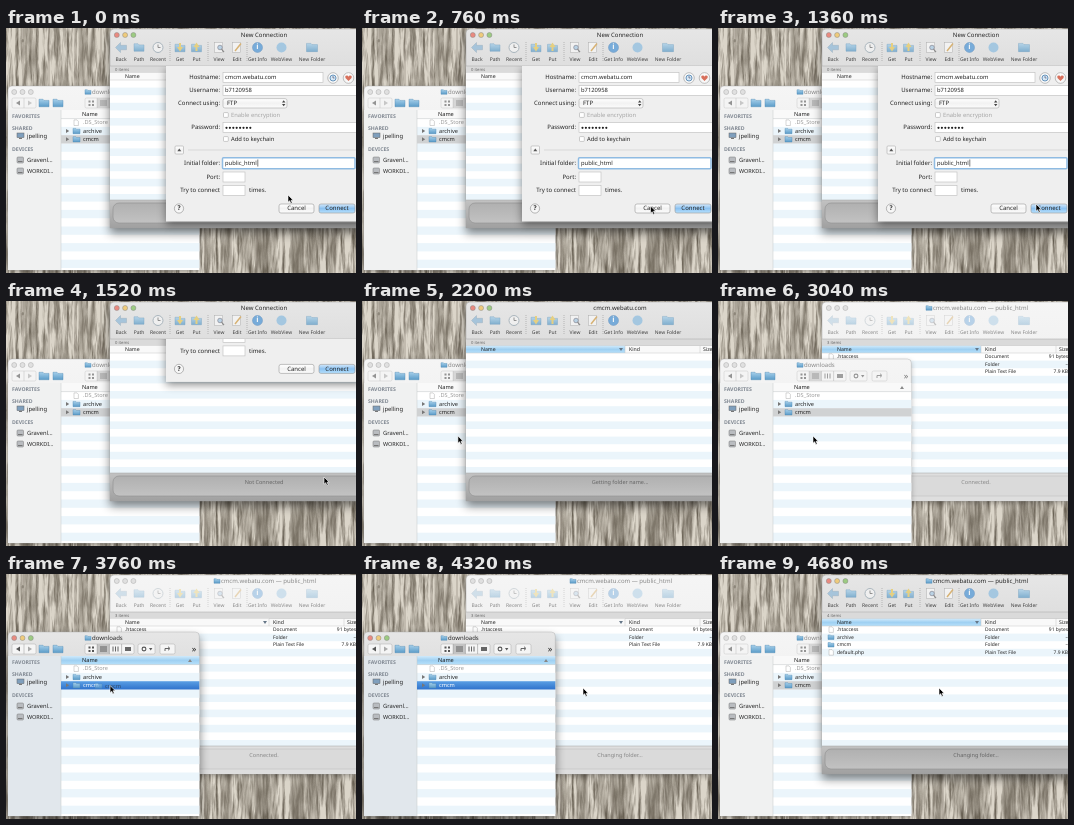
An HTML page that plays this animation: 350 px wide and 245 px high, repeating every 6680 ms.

```html
<!DOCTYPE html>
<html lang="en">
<head>
<meta charset="utf-8">
<title>Upload a folder</title>
<style>
html, body { margin: 0; width: 100%; height: 100%; overflow: hidden; background: #cbc5b8; }
svg { position: absolute; left: 0; top: 0; width: 100vw; height: 100vh; }
#wall { will-change: transform; }
text { font-family: "Noto Sans", "Open Sans", sans-serif; fill: #222; text-rendering: geometricPrecision; }
.win { filter: drop-shadow(0 2px 2.5px rgba(0,0,0,.25)); }
.win.front { filter: drop-shadow(0 5px 5px rgba(0,0,0,.48)); }
.chrome { fill: url(#pale); }
.front .chrome { fill: url(#steel); }
.icons { opacity: .72; }
.win:not(.front) .icons { opacity: .6; }
.win:not(.front) .tools { opacity: .6; }
.win:not(.front) .light { fill: #e0e0e0; stroke: #aaa; }
.win:not(.front) .title { fill: #888; }
.side { fill: #f0f1f1; }
.front .side { fill: #e1e7ec; }
.head { fill: #f9f9f9; }
.focus .head { fill: url(#sky); }
.pick { fill: #d0d2d3; }
.focus .pick { fill: url(#pickBlue); }
.focus .pickText { fill: #fff; }
.foot { fill: #dedede; }
.front .foot { fill: url(#footer); }
.pill { fill: #dadada; stroke: #c0c0c0; stroke-width: .6; }
.front .pill { fill: url(#pillFill); stroke: #8f8f8f; }
.status { fill: #666; }
.win:not(.front) .status { fill: #888; }
</style>
</head>
<body>
<svg id="wall" viewBox="0 0 350 245" preserveAspectRatio="none"></svg>
<svg id="stage" viewBox="0 0 350 245" preserveAspectRatio="none"></svg>
<script>
const LOOP = 6680;
const $ = id => document.getElementById(id);

let seed = 11;
const rnd = () => (seed = seed * 16807 % 2147483647) / 2147483647;
const between = (a, b) => (a + rnd() * (b - a)).toFixed(1);
const range = (n, f) => Array.from({ length: n }, (_, i) => f(i)).join('');

const rect = (x, y, w, h, fill, more = '') =>
  `<rect x="${x}" y="${y}" width="${w}" height="${h}" fill="${fill}" ${more}/>`;
const circle = (x, y, r, fill, more = '') =>
  `<circle cx="${x}" cy="${y}" r="${r}" fill="${fill}" ${more}/>`;
const path = (d, fill, more = '') => `<path d="${d}" fill="${fill}" ${more}/>`;
const line = (d, color, w = .6) => path(d, 'none', `stroke="${color}" stroke-width="${w}"`);
// y is the vertical middle of the lowercase letters
const text = (x, y, s, size = 6, more = '') =>
  `<text x="${x}" y="${y + size * .32}" font-size="${size}" ${more}>${s}</text>`;
const mid = 'text-anchor="middle"', end = 'text-anchor="end"';
const grad = (id, ...colors) =>
  `<linearGradient id="${id}" x1="0" y1="0" x2="0" y2="1">${colors.map((c, i) =>
    `<stop offset="${i / (colors.length - 1)}" stop-color="${c}"/>`).join('')}</linearGradient>`;

const defs = `<defs>
${grad('steel', '#e6e6e6', '#d2d2d2', '#b8b8b8')}
${grad('pale', '#f5f5f5', '#e6e6e6')}
${grad('sky', '#d0eafb', '#9fd0f2', '#b6e0fa')}
${grad('pickBlue', '#5a9fe4', '#2f72cc')}
${grad('footer', '#c2c2c2', '#a0a0a0')}
${grad('pillFill', '#b0b0b0', '#c2c2c2')}
${grad('button', '#ffffff', '#f2f2f2', '#fcfcfc')}
${grad('go', '#d3e8fb', '#8cc2f1', '#b5e0fd')}
${grad('folder', '#a5cfea', '#5c9cc8')}
<clipPath id="below"><rect x="104" y="38" width="246" height="207"/></clipPath>
</defs>`;

// weathered boards: stretched noise as grain, plus seams and stains
function wood() {
  const grain = (id, freq, gain, shift, n) =>
    `<filter id="${id}" x="0" y="0" width="1" height="1" color-interpolation-filters="sRGB">
<feTurbulence type="fractalNoise" baseFrequency="${freq}" numOctaves="4" seed="${n}"/>
<feColorMatrix values="0 0 0 0 .41 0 0 0 0 .38 0 0 0 0 .33 ${gain} 0 0 0 ${shift}"/></filter>` +
    rect(0, 0, 350, 245, '#000', `filter="url(#${id})"`);
  return rect(0, 0, 350, 245, '#dbd5c9') +
    grain('fine', '.3 .03', 2.4, -1, 4) + grain('broad', '.07 .012', 3, -1.45, 9) +
    range(14, i => line(`M${i * 26 + 17} 0V245`, 'rgba(95,88,76,.5)', .8)) +
    range(30, () => `<ellipse cx="${between(0, 350)}" cy="${between(0, 245)}" rx="${between(.4, 1.2)}" ry="${between(1, 7)}" fill="#5b5448" opacity=".45"/>`);
}

const folder = (x, y, w = 7) => {
  const h = w * .75;
  return path(`M${x} ${y - h / 2}h${w * .4}l${w * .1} ${h * .15}h${w * .5}v${h * .85}h${-w}z`,
    'url(#folder)', 'stroke="#4b86b0" stroke-width=".4"');
};
const page = (x, y) => path(`M${x} ${y - 2.8}h3l1.4 1.4v4.2h-4.4z`, '#fff', 'stroke="#999" stroke-width=".4"');
const lights = (x, y) => ['#e98a80', '#efcb7c', '#9ccb82'].map((c, i) =>
  circle(x + i * 8.3, y, 2.5, c, 'class="light" stroke="#888" stroke-width=".5"')).join('');
const stripes = (x, y, w, pitch, bottom) => rect(x, y, w, bottom - y, '#fff') +
  range(Math.ceil((bottom - y) / pitch), i => i % 2
    ? rect(x, y + i * pitch, w, Math.min(pitch, bottom - y - i * pitch), '#ebf5fb') : '');

function finder() {
  const row = i => 94.7 + i * 8.3;
  const box = (x, w) => rect(x, 70, w, 10, '#f5f5f5', 'rx="1.6" stroke="#aaa" stroke-width=".5"');
  const label = (y, s) => text(6, y, s, 5.2, 'font-weight="600" style="fill:#7f8791"');
  const disk = y => rect(11, y - 3, 6.5, 6, '#b9bcc0', 'rx="1" stroke="#777" stroke-width=".5"') +
    rect(12, y + 1, 4.5, 1, '#777');
  const arrow = y => path(`M60 ${y - 2}l3.2 2l-3.2 2z`, '#777');
  const tiles = [[82.5, 72.5], [86, 72.5], [82.5, 76], [86, 76]];
  return `<g id="finder" class="win">
${path('M2 242V62q0-4 4-4H189.300q4 0 4 4V242z', '#fff', 'class="chrome" stroke="#aaa" stroke-width=".4"')}
${lights(8.2, 64)}${folder(79, 64, 6)}${text(86, 64, 'downloads', 6, 'class="title"')}
<g class="tools">${box(6, 24)}${line('M18 70V80', '#aaa')}
${path('M14 72.500v5l-4-2.500z', '#555')}${path('M22 72.500v5l4-2.500z', '#aaa')}
${box(79, 49)}${rect(91.2, 70, 12.2, 10, '#c4c4c4')}${line('M91.200 70V80M103.400 70V80M115.600 70V80', '#999')}
${tiles.map(([x, y]) => rect(x, y, 2, 2, '#555')).join('')}
${line('M94 73h7M94 75h7M94 77h7', '#444', .8)}${line('M107 72.500v5M109.500 72.500v5M112 72.500v5', '#555', .9)}
${rect(119, 73, 6, 4, '#666')}${box(132, 17)}${circle(138, 75, 1.9, 'none', 'stroke="#555" stroke-width="1.1"')}
${path('M143 74h3.400l-1.700 2.400z', '#555')}${box(154, 15)}${line('M159 77v-2.500h4M162 72.700l2 1.800l-2 1.800', '#555', .9)}
${text(188, 75, '»', 9, mid)}</g>
${folder(33, 75, 10)}${folder(47, 75, 10)}
${rect(2, 82, 53, 160, '#eee', 'class="side"')}
${label(88, 'FAVORITES')}${label(100, 'SHARED')}${label(121, 'DEVICES')}
${rect(11, 105, 7, 4.6, '#7f9fbd', 'stroke="#666" stroke-width=".5"')}${rect(13, 110, 3, 1, '#777')}
${text(21, 108, 'jpelling', 5.8)}
${disk(132)}${text(21, 132, 'Gravenl…', 5.8)}${disk(143)}${text(21, 143, 'WORKDI…', 5.5)}
${stripes(55, 90.6, 138.3, 8.3, 242)}
${rect(55, 82, 138.3, 8.6, '#fff', 'class="head"')}${line('M55 90.600H193.300M55 82V242', '#c4c8cb', .5)}
${text(76, 86.4, 'Name', 5.6)}${path('M182 88h4l-2-3z', '#888')}
${page(68, row(0))}${text(77, row(0), '.DS_Store', 5.6, 'style="fill:#999"')}
${arrow(row(1))}${folder(67, row(1))}${text(77, row(1), 'archive', 5.6)}
${rect(55, row(2) - 4.1, 138.3, 8.3, '#ccc', 'class="pick"')}
${arrow(row(2))}${folder(67, row(2))}${text(77, row(2), 'cmcm', 5.6, 'class="pickText"')}
</g>`;
}

function toolbar() {
  const names = [[115, 'Back'], [133, 'Path'], [152, 'Recent'], [174, 'Get'], [190.5, 'Put'], [213, 'View'],
    [231, 'Edit'], [251.5, 'Get Info'], [275.5, 'WebView'], [306, 'New Folder']];
  const sheetIcon = x => rect(x, 14.5, 8, 10, '#f8f8f8', 'stroke="#999" stroke-width=".5"');
  const transfer = (x, d) => folder(x - 5, 20, 10) +
    path(`M${x - 3} 19h6l-3 ${4.5 * d}z`, '#e8c95c') + rect(x - 1, d > 0 ? 15 : 19, 2, 4, '#e8c95c');
  return '<g class="tools">' + names.map(([x, s]) => text(x, 31, s, 5, mid + ' opacity=".85"')).join('') +
    '<g class="icons">' +
    path('M109.500 19.500l5-5v2.800h6v4.500h-6v2.800z', '#8fb9d8', 'stroke="#7893a8" stroke-width=".4"') +
    folder(128, 19.5, 10) +
    circle(152, 19.5, 5, '#f4f4f4', 'stroke="#93a3ae" stroke-width="1"') + line('M152 16.500v3h2.500', '#555', .8) +
    transfer(174, 1) + transfer(190.5, -1) +
    sheetIcon(208.5) + circle(214, 19.5, 2.3, '#a9cbe4', 'stroke="#667" stroke-width=".7"') +
    line('M215.500 21.200l2.500 3', '#666', 1.1) +
    sheetIcon(226.5) + line('M229 23l6-7.500', '#d3a04a', 1.5) +
    circle(251.5, 19.5, 5, '#4f97d6', 'stroke="#3d77b0" stroke-width=".5"') +
    text(251.5, 19, 'i', 7.5, mid + ' font-weight="700" style="fill:#fff"') +
    circle(275.5, 19.5, 5, '#8dbde0') +
    folder(300.5, 19.5, 11) + '</g>' +
    path('M164 14V34M202 14V34M241 14V34', 'none', 'stroke="#999" stroke-width=".6" stroke-dasharray="1 1"') + '</g>';
}

function sheet() {
  const label = (y, s) => text(214, y, s, 6, end);
  const field = (y, w, s = '') => rect(217, y - 5, w, 10, '#fff', 'stroke="#bdbdbd" stroke-width=".6"') + text(219, y, s, 5.8);
  const check = (y, s, dim) => rect(217.5, y - 2.4, 4.8, 4.8, '#fff', 'rx=".8" stroke="#aaa" stroke-width=".6"') +
    text(225, y, s, 5.8, dim ? 'style="fill:#a5a5a5"' : '');
  const button = (x, y, w, s, fill) => rect(x, y - 4.5, w, 9, fill, 'rx="2" stroke="#999" stroke-width=".6"') +
    text(x + w / 2, y, s, 6, mid);
  const round = x => circle(x, 50, 5.3, 'url(#button)', 'stroke="#999" stroke-width=".6"');
  return `<g clip-path="url(#below)"><g id="sheet">
<g style="filter:drop-shadow(0 3px 4px rgba(0,0,0,.45))">${rect(160, 38, 196, 155.5, '#efefef')}</g>
${label(49.5, 'Hostname:')}${field(49.5, 100, 'cmcm.webatu.com')}
${round(327)}${circle(327, 50, 3, '#d7e8f5', 'stroke="#4a7fb0" stroke-width=".8"')}${line('M327 48v2h1.500', '#446')}
${round(342.5)}${path('M342.500 53l-3-3q-.8-2.500 1.500-2.400q1 .1 1.500 1.200q.5-1.100 1.500-1.200q2.300-.1 1.500 2.400z', '#d8705c')}
${label(62.5, 'Username:')}${field(62.5, 140, 'b7120958')}
${label(75.3, 'Connect using:')}${rect(217, 70.6, 64, 9.4, 'url(#button)', 'rx="2" stroke="#aaa" stroke-width=".6"')}
${text(221, 75.3, 'FTP', 6)}${path('M276 74.600l1.700-2.300l1.700 2.300zM276 76l1.700 2.300l1.700-2.300z', '#444')}
${check(87, 'Enable encryption', true)}
${label(99.5, 'Password:')}${field(99.5, 140)}${range(8, i => circle(220.5 + i * 3.4, 99.8, 1.1, '#222'))}
${check(111, 'Add to keychain')}
${rect(169, 118, 8.5, 8, 'url(#button)', 'rx="1" stroke="#aaa" stroke-width=".6"')}${path('M171.300 123.300h4l-2-2.800z', '#555')}
${line('M182 122H350', '#cdcdcd', .7)}
${label(135, 'Initial folder:')}${rect(216.5, 129.7, 132.5, 11, '#fff', 'rx="1" stroke="#8fbbe2" stroke-width="1.5"')}
${text(219, 135, 'public_html', 5.8)}<path id="caret" d="M251.800 131.500v7" stroke="#222" stroke-width=".6"/>
${label(149, 'Port:')}${field(149, 22)}
${label(162.5, 'Try to connect')}${field(162.5, 22)}${text(243, 162.5, 'times.', 6)}
${circle(173, 180.5, 4.6, 'url(#button)', 'stroke="#888" stroke-width=".6"')}${text(173, 180.2, '?', 6.5, mid + ' font-weight="600"')}
${button(273, 180.5, 35, 'Cancel', 'url(#button)')}${button(313, 180.5, 36, 'Connect', 'url(#go)')}
</g></g>`;
}

function client() {
  const row = (i, icon, name, kind, size) => {
    const y = 55.6 + i * 7.6;
    return (icon ? folder(110, y, 6) : page(111, y)) + text(119, y, name, 5) +
      text(267, y, kind, 4.9) + text(350, y, size, 4.9, end);
  };
  const htaccess = row(0, 0, '.htaccess', 'Document', '91 bytes');
  const archive = row(1, 1, 'archive', 'Folder', '–');
  const php = i => row(i, 0, 'default.php', 'Plain Text File', '7.9 KB');
  return `<g id="client" class="win">
${path('M104 200V5q0-4 4-4H408q4 0 4 4V200z', '#ddd', 'class="chrome" stroke="#999" stroke-width=".4"')}
${lights(110.8, 7)}${text(258, 7, '', 6, mid + ' id="title" class="title"')}
<g id="place">${folder(208, 7, 6)}</g>
${toolbar()}
${rect(104, 38, 308, 6.5, '#dadada')}${line('M104 38H412M104 44.500H412', '#a5a5a5', .5)}
${text(109, 41.3, '', 4.2, 'id="count" style="fill:#666"')}
${stripes(104, 52, 308, 7.6, 172)}
${rect(104, 44.7, 308, 7.3, '#f9f9f9')}${rect(104, 44.7, 159, 7.3, '#f9f9f9', 'class="head"')}
${line('M104 52H412', '#c5c5c5', .5)}${text(119, 48.4, 'Name', 5.2)}
<g id="columns">${line('M263 44.700V52M338 44.700V52', '#c5c5c5', .5)}${text(267, 48.4, 'Kind', 5.2)}${text(341, 48.4, 'Size', 5.2)}
${path('M257 47h4l-2 3z', '#678')}</g>
<g id="three">${htaccess}${archive}${php(2)}</g>
<g id="four">${htaccess}${archive}${row(2, 1, 'cmcm', 'Folder', '–')}${php(3)}</g>
${rect(104, 172, 308, 28, '#aaa', 'class="foot"')}${line('M104 172H412', '#a0a0a0', .5)}
<rect x="107" y="175" width="302" height="20" rx="6" class="pill"/>
${text(258, 181.7, '', 5.5, mid + ' id="status" class="status"')}
${sheet()}
</g>`;
}

const ghost = `<g id="ghost" opacity=".6">${folder(67, 111.3)}${text(77, 111.3, 'cmcm', 5.6)}</g>`;
const pointer = `<path id="pointer" d="M0 0V7.200L1.700 5.700L2.900 8.400L4.200 7.800L3 5.200H5.200Z" fill="#000" stroke="#fff" stroke-width=".6"/>`;

$('wall').innerHTML = wood();
$('stage').innerHTML = defs + `<g id="windows">${finder()}${client()}</g>` + ghost + pointer;

const smooth = (t, a, b) => {
  const u = Math.min(1, Math.max(0, (t - a) / (b - a)));
  return u * u * (3 - 2 * u);
};

// time, x, y
const moves = [[0, 282, 167], [300, 282, 167], [720, 288.5, 178], [820, 288.5, 178], [1200, 318, 176],
  [1600, 318, 176], [2160, 96, 135], [2400, 95, 135], [3120, 95, 135], [3480, 82, 111], [3640, 82, 111],
  [4120, 221, 114], [LOOP, 221, 114]];

function pointerAt(t) {
  const i = moves.findIndex(m => m[0] > t);
  const [t0, x0, y0] = moves[i - 1], [t1, x1, y1] = moves[i];
  const k = smooth(t, t0, t1);
  return [x0 + (x1 - x0) * k, y0 + (y1 - y0) * k];
}

// last value whose start time has passed
const pick = (t, steps) => steps.filter(s => s[0] <= t).pop()[1];
const show = (id, on) => $(id).style.display = on ? '' : 'none';
const put = (id, s) => { if ($(id).textContent !== s) $(id).textContent = s; };
const style = (id, name, on) => $(id).classList.toggle(name, on);

function draw(t) {
  // the clicked window rises first and takes the focus just after
  const finderTop = t >= 3040 && t < 4440;
  const finderFocus = t >= 3080 && t < 4440;
  const top = $(finderTop ? 'finder' : 'client');
  if ($('windows').lastElementChild !== top) $('windows').appendChild(top);

  style('finder', 'front', finderFocus);
  style('finder', 'focus', finderFocus);
  style('client', 'front', !finderTop);
  style('client', 'focus', t >= 1840 && !finderFocus);

  const listed = t >= 2560;
  put('title', pick(t, [[0, 'New Connection'], [1840, 'cmcm.webatu.com'], [2560, 'cmcm.webatu.com — public_html']]));
  $('title').setAttribute('x', listed ? 262.5 : 258);
  show('place', listed);
  put('status', pick(t, [[0, 'Not Connected'], [1840, 'Getting folder name...'], [2680, 'Connected.'], [4200, 'Changing folder...']]));
  put('count', pick(t, [[0, '0 items'], [2640, '3 items'], [4560, '4 items']]));
  show('columns', t >= 1840);
  show('three', t >= 2640 && t < 4560);
  show('four', t >= 4560);

  show('sheet', t < 1595);
  $('sheet').setAttribute('transform', `translate(0 ${-156 * smooth(t, 1382, 1595)})`);
  show('caret', t % 1000 < 500);

  const [x, y] = pointerAt(t);
  $('pointer').setAttribute('transform', `translate(${x} ${y})`);
  show('ghost', t >= 3640 && t < 4160);
  $('ghost').setAttribute('transform', `translate(${x - 82} ${y - 111})`);
}

const start = performance.now();
function tick() {
  draw((performance.now() - start) % LOOP);
  requestAnimationFrame(tick);
}
tick();
</script>
</body>
</html>
```
